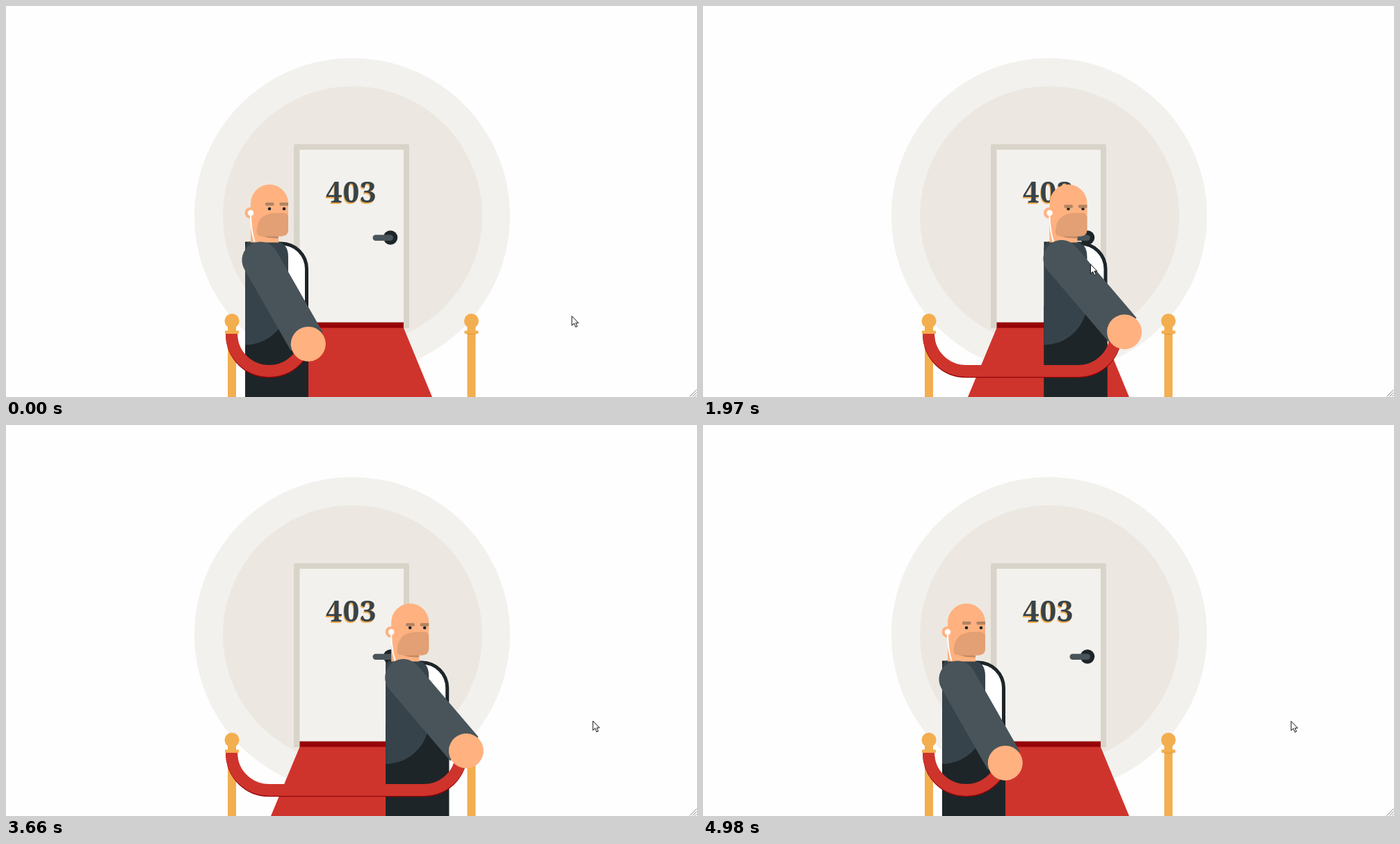
An HTML page that plays this animation: 994x563 px, repeating every 5100 ms.

```html
<!DOCTYPE html>
<html lang="en">
<head>
<meta charset="utf-8">
<title>403</title>
<style>
  html, body { margin: 0; width: 100%; height: 100%; overflow: hidden; background: #fefefe; }
  svg { display: block; width: 100vw; height: 100vh; }
  .number { font: 900 42px "Noto Serif", "DejaVu Serif", serif; text-anchor: middle; letter-spacing: 1px; }
  .skin { fill: #ffb180; }
  .black { fill: #1e2528; }
  .slate { fill: #37434a; }
  .sleeve { fill: #48545a; }
  .rope { fill: none; stroke-width: 17; }
</style>
</head>
<body>
<svg viewBox="0 0 994 563">
  <defs>
    <g id="post" fill="#f3ae4f">
      <rect x="319" y="458" width="12" height="105"/>
      <circle cx="325" cy="453.5" r="10.5"/>
      <rect x="319" y="471" width="12" height="2" fill="#dc983d"/>
      <rect x="315" y="467.5" width="20" height="4.5" rx="1"/>
    </g>
  </defs>

  <circle cx="498" cy="302" r="227" fill="#f2f1ed"/>
  <circle cx="498.5" cy="302" r="186.5" fill="#ece8e1"/>

  <!-- door and carpet -->
  <path d="M414 464V201q0-2 2-2H578q2 0 2 2V464Z" fill="#d9d4c9"/>
  <rect x="422.5" y="207" width="149.5" height="249" fill="#f2f1ed"/>
  <g class="number">
    <text x="496" y="284.5" fill="#f3ae4f">403</text>
    <text x="497" y="283" class="slate">403</text>
  </g>
  <circle class="black" cx="553" cy="333.5" r="10.3"/>
  <rect class="sleeve" x="527.5" y="329.5" width="29.5" height="8.5" rx="4.2"/>
  <rect x="422.5" y="455.5" width="149.5" height="9" fill="#960409"/>
  <path d="M422.5 463.5H572L613 563H381Z" fill="#ce342c"/>

  <use href="#post"/>
  <use href="#post" x="344.5"/>

  <g id="bouncer">
    <path class="black" d="M344 339.5H396A39 39 0 0 1 435 378.500V563H344Z"/>
    <path d="M390 344.500H396A34 34 0 0 1 430 378.500V440H390Z" fill="#fff"/>
    <path class="black" d="M344 432H435V563H344Z"/>
    <path class="slate" d="M344 349Q344 339 354 339H388Q406 341 406 361V426A62 62 0 0 1 344 488Z"/>
    <rect class="skin" x="352" y="310" width="40" height="30.500"/>
    <path d="M368 331H392V334.500Q378 335 368 331Z" fill="#c28a64"/>
    <path class="skin" d="M352 331V284A27 27 0 0 1 406 284V321Q406 331.500 395.500 331.500Z"/>
    <path d="M360.500 325V324Q362 298 389 298H399Q406 298 406 305V321Q406 331.500 395.500 331.500H368Q360.500 331.500 360.500 325Z" fill="#e2a074"/>
    <g class="black">
      <circle cx="379" cy="292" r="2.300"/>
      <circle cx="400" cy="292" r="2.300"/>
    </g>
    <g id="brows" fill="#b08462">
      <rect x="373" y="283" width="12.500" height="4.500" rx="1.500"/>
      <path d="M395 283H406V287.500H395Q393.500 287.500 393.500 286V284.500Q393.500 283 395 283Z"/>
    </g>
    <circle class="skin" cx="351.500" cy="298" r="8"/>
    <circle cx="352" cy="298" r="4.300" fill="#fff"/>
    <path d="M352 300Q352 322 357.500 339.500" fill="none" stroke="#fff" stroke-width="2"/>
  </g>

  <path class="rope" id="ropeShade" stroke="#960409" transform="translate(0 1.3)"/>
  <path class="rope" id="rope" stroke="#ce342c"/>

  <!-- the arm hangs straight down here and is swung around its shoulder pivot -->
  <g id="arm">
    <path class="sleeve" d="M328 369A26.500 26.500 0 0 1 381 369V504H328Z"/>
    <circle class="skin" cx="354.500" cy="508" r="25"/>
  </g>

  <path id="cursor" d="M.500.500V14L3.700 11L6 16.300L8.200 15.300L6 10.300H10Z" fill="#fff" stroke="#111" stroke-width="1"/>
  <path d="M983.500 562.500L993.500 552.500M987.500 562.500L993.500 556.500M991 562.500L993.500 560" stroke="#8a8a8a"/>
</svg>
<script>
  const LOOP = 5100, BLOCK_AT = 1401, RETREAT_AT = 3554, REACH = 215;
  const el = id => document.getElementById(id);
  const move = (id, x, y) => el(id).setAttribute("transform", `translate(${x} ${y})`);
  const clamp = v => Math.min(1, Math.max(0, v));
  const smooth = p => p * p * (3 - 2 * p);
  const mix = (a, b, p) => a + (b - a) * p;

  // cubic-bezier(.25, .1, .25, 1)
  function ease(p) {
    p = clamp(p);
    if (p === 0 || p === 1) return p;
    const bezier = (a, b, u) => 3 * a * u * (1 - u) ** 2 + 3 * b * u * u * (1 - u) + u ** 3;
    let low = 0, high = 1;
    for (let i = 0; i < 24; i++) {
      const mid = (low + high) / 2;
      if (bezier(.25, .25, mid) < p) low = mid; else high = mid;
    }
    return bezier(.1, 1, low);
  }

  // 0 = at rest on the left, 1 = blocking the door
  const blocking = (t, duration) =>
    ease((t - BLOCK_AT) / duration) - ease((t - RETREAT_AT) / duration);

  // The picture advances in 60 ms steps.
  function snap(t) {
    if (t < 1180) return 0;
    const anchor = t < 3240 ? 1970 : 3240;
    return Math.max(1180, anchor + 60 * Math.floor((t - anchor) / 60));
  }

  function cursorAt(t) {
    if (t < 3240) {
      const p = smooth(clamp((t - 1150) / 310));
      return [mix(813.5, 557, p), mix(446, 371.5, p)];
    }
    const p = smooth(clamp((t - 3240) / 430) ** 2);
    return [mix(557, 845.5, p), mix(371.5, 426, p)];
  }

  function draw(t) {
    const x = REACH * blocking(t, 1425);
    const angle = -29.7 - 12.15 * blocking(t, 950);
    move("bouncer", x, 0);
    move("brows", 0, 3.3 * blocking(t, 475));
    el("arm").setAttribute("transform", `translate(${x} 0) rotate(${angle} 354.5 346)`);
    const rope = `M324.500 472A54 53.500 0 0 0 378.500 525.500h${1.1 * x}a54 53.500 0 0 0 54 -53.500`;
    el("rope").setAttribute("d", rope);
    el("ropeShade").setAttribute("d", rope);
    move("cursor", ...cursorAt(t));
  }

  const begin = performance.now();
  function tick() {
    draw(snap((performance.now() - begin) % LOOP));
    requestAnimationFrame(tick);
  }
  tick();
</script>
</body>
</html>
```
